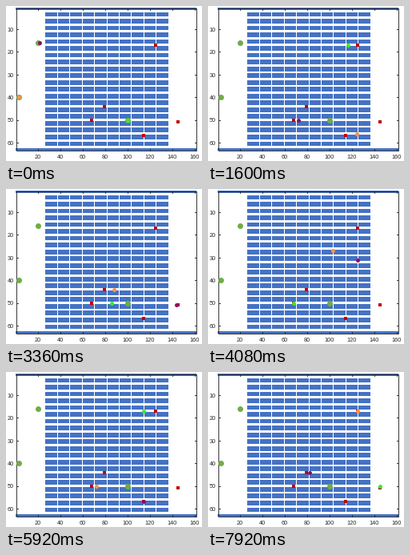
A matplotlib script that plays this animation: 245x194 px, repeating every 8000 ms.

```python
import numpy as np
import matplotlib.pyplot as plt
from matplotlib.animation import FuncAnimation
from matplotlib.patches import Rectangle

WIDTH, HEIGHT, DPI = 245, 194, 100
FRAMES, INTERVAL = 100, 80
PT = 72 / DPI  # points per pixel
LEFT, TOP, RIGHT, BOTTOM = 12.5, 2.5, 237.5, 180.5
INK, SHELF = "#262626", "#4472C4"


def px(x):
    return 13.5 + 1.4 * (x - 1)


def py(y):
    return 3.4 + 2.84 * (y - 1)


fig = plt.figure(figsize=(WIDTH / DPI, HEIGHT / DPI), dpi=DPI, facecolor="white")
ax = fig.add_axes([0, 0, 1, 1])
ax.set_xlim(0, WIDTH)
ax.set_ylim(HEIGHT, 0)
ax.axis("off")


def block(x0, y0, x1, y1, color):
    """Fill a rectangle snapped to whole pixels."""
    x0, y0, x1, y1 = np.round([x0, y0, x1, y1])
    ax.add_patch(Rectangle((x0, y0), x1 - x0, y1 - y0, fc=color, lw=0,
                           antialiased=False, zorder=1))


def line(xs, ys):
    ax.plot(xs, ys, color=INK, lw=0.9 * PT, zorder=2)


def dot(place, marker, size, color, zorder):
    return ax.plot(px(place[0]), py(place[1]), marker, ms=size * PT,
                   color=color, mew=0, zorder=zorder)[0]


# Shelf rows cut by one-cell cross aisles, and the outer walls
for row in range(20):
    y = 2.5 + 3 * row
    block(px(26.5), py(y), px(136.5), py(y + 2), SHELF)
for x in range(37, 126, 11):
    gap = round(px(x))
    block(gap, py(2.5), gap + 1, py(61.5), "white")
for y in (1, 63):
    block(LEFT, py(y - 0.5), RIGHT, py(y + 0.5), SHELF)

# Frame, inward ticks and labels
line([LEFT, RIGHT, RIGHT, LEFT, LEFT], [TOP, TOP, BOTTOM, BOTTOM, TOP])
label = dict(fontname="Liberation Sans", fontsize=7.4 * PT, color=INK)
for value in range(20, 161, 20):
    x = px(value)
    for edge, step in ((TOP, 2), (BOTTOM, -2)):
        line([x, x], [edge, edge + step])
    ax.text(x, 188.8, str(value), ha="center", va="center_baseline", **label)
for value in range(10, 61, 10):
    y = py(value)
    for edge, step in ((LEFT, 2), (RIGHT, -2)):
        line([edge, edge + step], [y, y])
    ax.text(10, y + 0.3, str(value), ha="right", va="center_baseline", **label)

DOCKS = [(20, 16), (3, 40), (100, 50)]
GOALS = A, B, C, D, E = [(125, 17), (79.5, 44), (67.5, 50), (114, 57), (145, 51)]
for dock in DOCKS:
    dot(dock, "o", 7, "#70AD47", 3)
for goal in GOALS:
    dot(goal, "s", 4, "#C00000", 4)

# Each leg lists the stops made between two check times
CHECK_TIMES = (0, 20, 34, 51, 63, 84, 99)
ROBOTS = {
    "#8A0F6A": ((21, 16), [
        [(81, 44), (72, 50)], [C, (114, 56)], [D, E, (125, 31)],
        [A, (143, 51)], [E, D, (82, 53)], [C, (82, 44)]]),
    "#F79646": ((3, 40), [
        [D, (124, 56)], [E, (82, 26)], [B, (103, 27)],
        [A], [C, E, (145, 38)], [A]]),
    "#32F032": ((100, 50), [
        [(116, 17)], [A, (95.6, 56)], [C],
        [(103.5, 53)], [D, A, (113.5, 44)], [D, (145, 50)]]),
}


def cross_aisle(x):
    return 37 + 11 * round((x - 37) / 11)


def can_cross(x):
    return x == cross_aisle(x) or x < 20 or x > 136


def walk(start, end):
    """Corner points of a drive that changes rows only in a cross aisle."""
    (x0, y0), (x1, y1) = start, end
    x = x0 if can_cross(x0) else x1 if can_cross(x1) else cross_aisle(x0)
    return [(x, y0), (x, y1), end]


def drive(start, legs):
    """Times and points of a whole route, at even speed within each leg."""
    times, points = [0], [start]
    for t0, t1, stops in zip(CHECK_TIMES, CHECK_TIMES[1:], legs):
        path = [points[-1]]
        for stop in stops:
            path += walk(path[-1], stop)
        travelled = np.cumsum(np.abs(np.diff(path, axis=0)).sum(axis=1))
        times += list(t0 + (t1 - t0) * travelled / travelled[-1])
        points += path[1:]
    return np.array(times), np.array(points)


robots = [(dot(start, "o", 5, color, 5), *drive(start, legs))
          for color, (start, legs) in ROBOTS.items()]


def update(frame):
    for robot, times, points in robots:
        x, y = (np.interp(frame, times, values) for values in points.T)
        robot.set_data([px(x)], [py(y)])
    return [robot for robot, *_ in robots]


anim = FuncAnimation(fig, update, frames=FRAMES, interval=INTERVAL,
                     repeat=True, repeat_delay=0)
plt.show()
```
